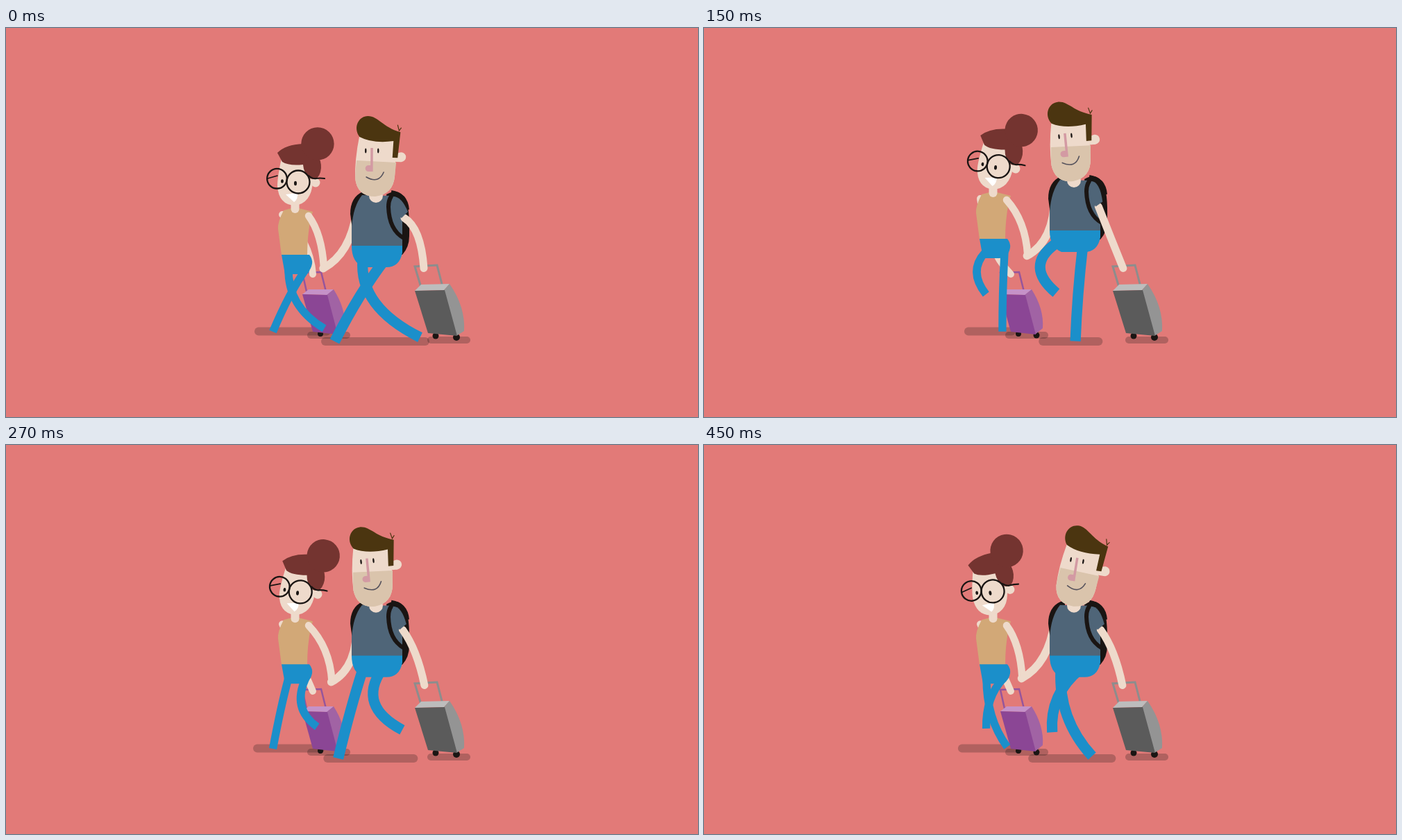
An HTML page with a canvas for the animation above (0.48 s loop, 997x561 px).

```html
<!DOCTYPE html>
<html lang="en">
<head>
<meta charset="utf-8">
<title>Walking travellers</title>
<style>
html, body { margin: 0; width: 100%; height: 100%; overflow: hidden; background: #e27a78; }
canvas { display: block; }
</style>
</head>
<body>
<canvas id="stage" width="997" height="561"></canvas>
<script>
const ctx = document.getElementById('stage').getContext('2d');
const LOOP = 480, STEP = 30;
const SKIN = '#eedacb', JEANS = '#1b8fca', BLACK = '#1a1513', SHIRT = '#4f6578';

const fill = (d, color) => { ctx.fillStyle = color; ctx.fill(new Path2D(d)); };
const stroke = (d, color, width, cap = 'round') => {
  ctx.strokeStyle = color;
  ctx.lineWidth = width;
  ctx.lineCap = cap;
  ctx.stroke(new Path2D(d));
};
const oval = (x, y, rx, color, ry = rx) => {
  ctx.fillStyle = color;
  ctx.beginPath();
  ctx.ellipse(x, y, rx, ry, 0, 0, 7);
  ctx.fill();
};
const ring = (x, y, r) => {
  ctx.strokeStyle = BLACK;
  ctx.lineWidth = 2.3;
  ctx.beginPath();
  ctx.arc(x, y, r, 0, 7);
  ctx.stroke();
};
const shadow = (x1, x2, y, h) =>
  stroke(`M${x1 + h / 2} ${y}H${x2 - h / 2}`, 'rgba(20,20,20,.24)', h);

function placed(dy, draw, angle = 0, px = 0, py = 0) {
  ctx.save();
  ctx.translate(px, py + dy);
  ctx.rotate(angle * Math.PI / 180);
  ctx.translate(-px, -py);
  draw();
  ctx.restore();
}

const manGait = {
  hip: 514, hipY: 334, hipSpread: 32, sway: 9, knee: 23.5, foot: 511, floor: 452,
  spread: 20, reach: 71.5, drift: 14, lift: 74, width: 15.2
};
const womanGait = {
  hip: 407, hipY: 346.5, hipSpread: 26, sway: 2, knee: 13.5, foot: 409, floor: 438,
  spread: 19, reach: 46.5, drift: 3, lift: 57, width: 11.3
};

// The foot slides back on the ground for half a loop, then swings forward in the air.
function leg(g, phase, near, dy) {
  const slide = 1 - Math.abs(phase / 120 - 2);
  const back = Math.max(0, slide) ** 2;
  const air = Math.max(0, -Math.sin(2 * Math.PI * phase / LOOP)) ** 0.7;
  const footGap = near * (g.spread * (1 - back) + 6 * air);
  const hipGap = near * g.hipSpread;

  const hx = g.hip - g.sway * air, hy = g.hipY + dy;
  const fx = g.foot + g.reach * slide * Math.abs(slide) + g.drift * slide ** 2;
  const fy = g.floor - g.lift * (air + 0.08 * back);
  const cx = (hx + fx + hipGap + footGap) / 2 - 2 * g.knee * (air + back);
  const cy = (hy + fy) / 2 + 12 * slide;
  stroke(`M${hx + hipGap} ${hy}Q${cx} ${cy} ${fx + footGap} ${fy}`, JEANS, g.width, 'butt');
}

function legs(gait, t, dy) {
  leg(gait, (t + LOOP / 2) % LOOP, 0, dy);
  leg(gait, t, 1, dy);
}

function purpleCase() {
  oval(453, 441, 4, BLACK);
  oval(479, 443, 4.5, BLACK);
  stroke('M433 380L427 353L454 352L461 380', '#96559c', 2.5);
  fill('M427 384L436 377H472L463 385Z', '#c592c8');
  fill('M462 385L472 377Q490 405 488 433L477 442Z', '#a163a4');
  fill('M427 384L463 385L478 442L442 438Z', '#8b4695');
}

function greyCase() {
  oval(619, 444, 4.5, BLACK);
  oval(649, 446, 5, BLACK);
  stroke('M598 374L589 344L621 342L629 373', '#8d8d8d', 3);
  fill('M589 379L598 370L639 369L631 378Z', '#bdbdbd');
  fill('M631 378L639 369Q662 402 660 437L649 444Z', '#949494');
  fill('M589 379L632 378L650 444L608 440Z', '#5b5b5b');
}

function womanHead() {
  fill('M397 188Q391 215 391 228Q393 255 416 256Q440 253 442 222L440 190Z', SKIN);
  fill('M391 180Q403 168 428 167Q455 180 454 202Q453 214 445 219L438 217Q429 210 428 197Q407 199 398 193Z', '#743430');
  oval(449, 167, 23.7, '#743430');
  oval(446, 223, 6.5, SKIN);
  fill('M403 240L420 238Q421 247 415 251Z', '#fff');
  oval(398, 221, 1.9, BLACK, 2.8);
  oval(417, 224, 2, BLACK, 3.2);
  stroke('M377 217L391 213', BLACK, 1.7);
  stroke('M436 213Q442 218 447 217T459 217', BLACK, 2.2);
  ring(390.5, 217.2, 14.3);
  ring(421, 222, 16.5);
}

function manHead() {
  fill('M509 155Q502 190 503 217Q506 243 532 243Q558 240 560 213L563 155Z', SKIN);
  fill('M505 191L562 194L560 213Q558 240 532 243Q506 243 503 217Q503 205 505 191Z', '#dac4ac');
  oval(569, 186, 7, SKIN);
  fill('M558 180H569V193H561Z', SKIN);
  fill('M509 157C499 143 508 127 521 127C536 127 542 143 568 150L564 187H556.5L558 163Q528 167 509 157Z', '#4b3510');
  stroke('M564 140L566 148L569 144', '#4b3510', 1.2);
  oval(518, 177, 1.2, BLACK, 3.5);
  oval(536, 177, 1.2, BLACK, 3.5);
  fill('M525 173H528.5V207H522A4.5 4.5 0 0 1 522 198H525Z', '#d39aa3');
  stroke('M519 215Q537 225 544 208', '#55525c', 1.6);
}

function manBack() {
  fill('M514 236Q496 244 496 268L499 290H520V236Z', BLACK);
  fill('M548 240Q565 230 575 246Q582 258 581 300Q581 316 571 327H560Z', BLACK);
}

function manBody() {
  fill('M513 241Q500 257 498 288V315H571V275L557 242Z', SHIRT);
  fill('M498 314H571V324Q567 345 548 345H515Q498 338 498 314Z', JEANS);
  oval(533, 242, 10, SKIN);
  stroke('M561 238Q551 243 551 258Q552 291 573 303', BLACK, 6, 'butt');
  stroke('M555 237Q576 240 578 262', BLACK, 6, 'butt');
}

function womanBody() {
  fill('M411 260L400 263Q391 280 392 290L397 328H434Q434 300 439 275L442 265L422 260Z', '#d2a877');
  fill('M397 327H437Q442 333 441 340Q438 355 425 355H402Z', JEANS);
  stroke('M416.5 250V261', SKIN, 12);
}

function draw(t) {
  const bounce = time => Math.abs(1 - time % 240 / 120);
  const drop = bounce(t) ** 2;
  const tilt = bounce(t + 30) ** 2.2;
  const sway = Math.cos(2 * Math.PI * t / LOOP);
  const manY = -23.5 * (1 - drop), womanY = -24.5 * (1 - drop);
  const handX = 464 - 6 * sway, handY = 350.5 - 2.8 * sway + manY;

  ctx.fillStyle = '#e27a78';
  ctx.fillRect(0, 0, 997, 561);

  shadow(377 - (28.5 - 9.5 * sway) * drop, 448 + 20 * drop, 437.5, 12);
  shadow(434, 496, 443, 10);
  shadow(485 - (40.5 - 9.5 * sway) * drop, 572 + 38 * drop, 452, 12);
  shadow(607, 669, 450, 10);

  purpleCase();
  stroke(`M398 ${269 + womanY}Q${405 + 33 * drop} ${321 - 16 * drop} 442 355`, SKIN, 10);
  legs(womanGait, t, womanY);
  placed(womanY, womanBody);
  placed(womanY, womanHead, 9.1 - 17.2 * tilt, 416, 256.5);
  stroke(`M436 ${271 + womanY}Q${handX - 3} ${handY - 51} ${handX} ${handY - 2}`, SKIN, 10.5);

  greyCase();
  stroke(`M505 ${265 + manY}Q${handX + 38} ${handY - 22} ${handX - 1} ${handY - 1}`, SKIN, 11.5);
  placed(manY, manBack);
  legs(manGait, t, manY);
  placed(manY, manBody);
  const armX = 568 + 6 * drop, armY = 280 - 6 * drop + manY;
  stroke(`M${armX} ${armY}Q${585 + 13 * drop} ${303 - 14 * drop} ${604 - 2 * drop} 346.5`, SKIN, 11);
  placed(manY, () => fill(`M558 243Q570 243 ${574 + 5 * drop} ${273 - 8 * drop}L${564 + 6 * drop} ${280 - 6 * drop}Q554 266 555 252Z`, SHIRT));
  placed(manY, manHead, -9.7 + 18.7 * tilt, 532.5, 243.5);
}

function tick(now) {
  draw(Math.floor(now % LOOP / STEP) * STEP);
  requestAnimationFrame(tick);
}
tick(performance.now());
</script>
</body>
</html>
```
